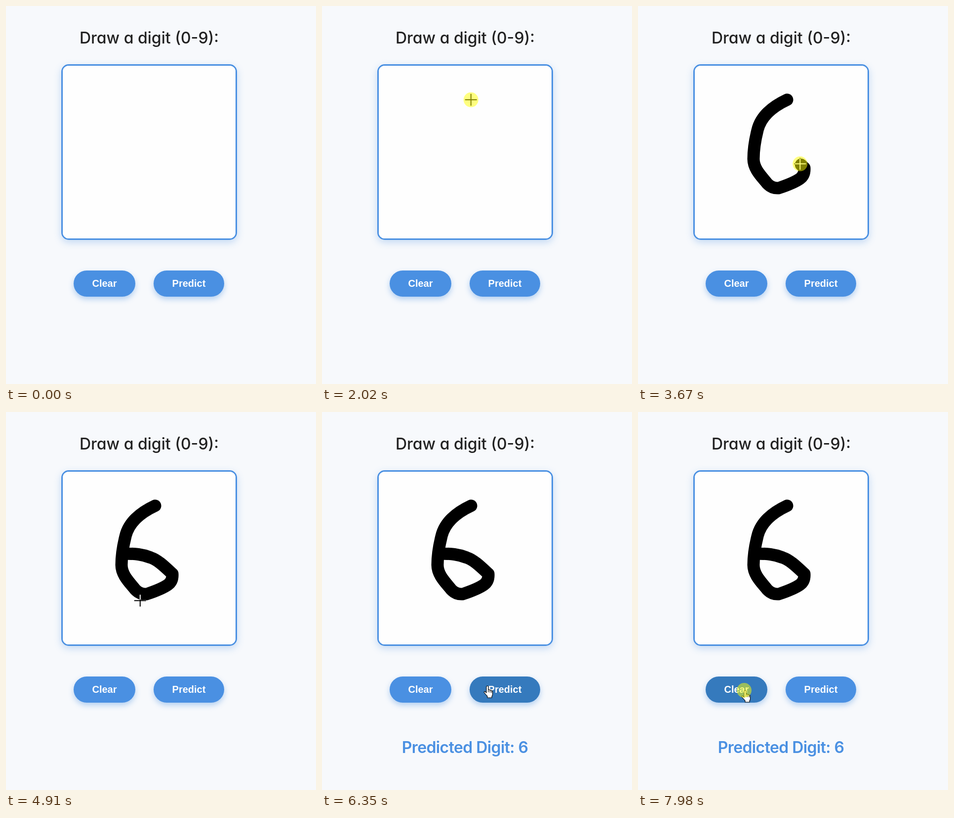
These frames come from a looping animation (628x766 px, 8000 ms). An HTML page:

```html
<!DOCTYPE html>
<html lang="en">
<head>
<meta charset="utf-8">
<title>Digit pad</title>
<style>
  html, body { margin: 0; width: 100%; height: 100%; overflow: hidden; background: #f7f9fc; }
  svg { position: absolute; left: 0; top: 0; width: 628px; height: 766px; }
  .pad, .button { position: absolute; box-sizing: border-box; }
  .pad {
    left: 112px; top: 118px; width: 356px; height: 356px;
    border: 3px solid #4a90e2; border-radius: 15px; background: #fefefe;
    box-shadow: 0 5px 15px rgba(74, 144, 226, .3);
  }
  .button {
    top: 536px; height: 53px; border-radius: 27px; color: #fff; text-align: center;
    font: bold 20px/53px "Liberation Sans", Arial, sans-serif;
    box-shadow: 0 5px 12px rgba(74, 144, 226, .4);
  }
  #clear { left: 137px; width: 125px; }
  #predict { left: 299px; width: 143px; }
  text { font: 500 32px Inter, "Open Sans", sans-serif; font-feature-settings: "cv11"; text-anchor: middle; fill: #222; }
  #result { font-weight: 600; letter-spacing: -.6px; fill: #4a90e2; }
  #ink { fill: none; stroke: #000; stroke-width: 25; stroke-linecap: round; stroke-linejoin: round; }
  #cross { stroke: #fff; stroke-width: 2; mix-blend-mode: difference; }
  #arrow, #hand { fill: #fff; stroke: #000; stroke-width: 1.1; stroke-linejoin: round; }
  #press { fill: #ff0; fill-opacity: .5; }
</style>
</head>
<body>
<div class="pad"></div>
<div class="button" id="clear">Clear</div>
<div class="button" id="predict">Predict</div>
<svg viewBox="0 0 628 766">
  <text x="290" y="75.5">Draw a digit (0-9):</text>
  <text id="result" x="289.5" y="691">Predicted Digit: 6</text>
  <rect x="115" y="121" width="350" height="350" rx="12" fill="#fefefe"/>
  <path id="ink" d="M302 190C270 205 248 226 242 252C237 272 234 290 234 310C234 330 250 345 262 360Q272 370 285 369C300 364 318 357 328 350Q338 343 337 328C322 314 308 300 293 295C275 288 262 287 235 287"/>
  <path id="cross" d="M-12 0H12M0-12V12"/>
  <path id="arrow" d="M0 0V18L4 14.3L7 21L10 19.7L7 13.2H12.7Z"/>
  <path id="hand" d="M0 2Q0 0 2 0T4 2V8Q6 7 7.5 9Q9.5 8 10.5 10Q13 9.5 12.5 13V17Q12.5 20 11 21V24H2V21Q-1 18-4.5 13.5Q-5 11-2.5 11.5L0 14ZM0 14V2M4 8V13M7.4 9V13.5M10.5 10V14"/>
  <circle id="press" r="15"/>
</svg>
<script>
const LOOP = 8000, DRAW_START = 2020, DRAW_END = 4510, INK_LAG = 3;
const el = id => document.getElementById(id);
const ramp = (v, from, to) => Math.min(1, Math.max(0, (v - from) / (to - from)));
const easeOut = k => k * (2 - k);
const easeInOut = k => k * k * (3 - 2 * k);
const within = (v, from, to) => v >= from && v < to;

// The pen slows down after the first long curve.
const penProgress = time => .51 * ramp(time, DRAW_START, 2830) + .49 * ramp(time, 2830, DRAW_END);

function move(start, end, ease, d) {
  const path = document.createElementNS("http://www.w3.org/2000/svg", "path");
  path.setAttribute("d", d);
  return { start, path, progress: time => ease(ramp(time, start, end)) };
}

const moves = [
  move(250, 460, easeOut, "M460 558Q315 400 293 357"),
  move(700, 1140, easeInOut, "M293 357C265 300 265 215 309 186"),
  move(1340, 1800, easeOut, "M309 186L300 188"),
  { start: DRAW_START + 1, path: el("ink"), progress: penProgress },
  move(4840, 5200, easeOut, "M235 288L271 380L302 468L333 555"),
  move(7110, 7450, easeInOut, "M333 555L215 564")
];

function pointerAt(time) {
  const { path, progress } = moves.findLast(m => time >= m.start) || moves[0];
  return path.getPointAtLength(progress(time) * path.getTotalLength());
}

function buttonColor(hover) {
  const k = easeInOut(hover);
  const mix = (a, b) => Math.round(a + (b - a) * k);
  return `rgb(${mix(74, 53)}, ${mix(144, 122)}, ${mix(226, 189)})`;
}

function show(id, visible, { x, y }) {
  el(id).setAttribute("transform", `translate(${x} ${y})`);
  el(id).style.display = visible ? "" : "none";
}

function render(time) {
  const point = pointerAt(time);
  const { x, y } = point;
  const shown = time >= 250;
  const onPad = within(x, 112, 468) && within(y, 118, 474);
  const onButton = within(y, 536, 589) && (within(x, 137, 262) || within(x, 299, 442));
  const pressed = within(time, 1770, 4580) || within(time, 5870, 6070) || time >= 7980;

  show("cross", shown && onPad, point);
  show("hand", shown && onButton, point);
  show("arrow", shown && !onPad && !onButton, point);
  show("press", pressed, point);

  const ink = el("ink");
  const drawn = Math.max(0, penProgress(time) * ink.getTotalLength() - INK_LAG);
  ink.style.strokeDasharray = `${drawn} 999`;
  ink.style.display = drawn > 0 ? "" : "none";

  el("predict").style.background = buttonColor(ramp(time, 5050, 5400) - ramp(time, 7250, 7600));
  el("clear").style.background = buttonColor(ramp(time, 7310, 7630));
  el("result").style.opacity = ramp(time, 6000, 6350);
}

function tick() {
  render(performance.now() % LOOP);
  requestAnimationFrame(tick);
}
tick();
</script>
</body>
</html>
```
